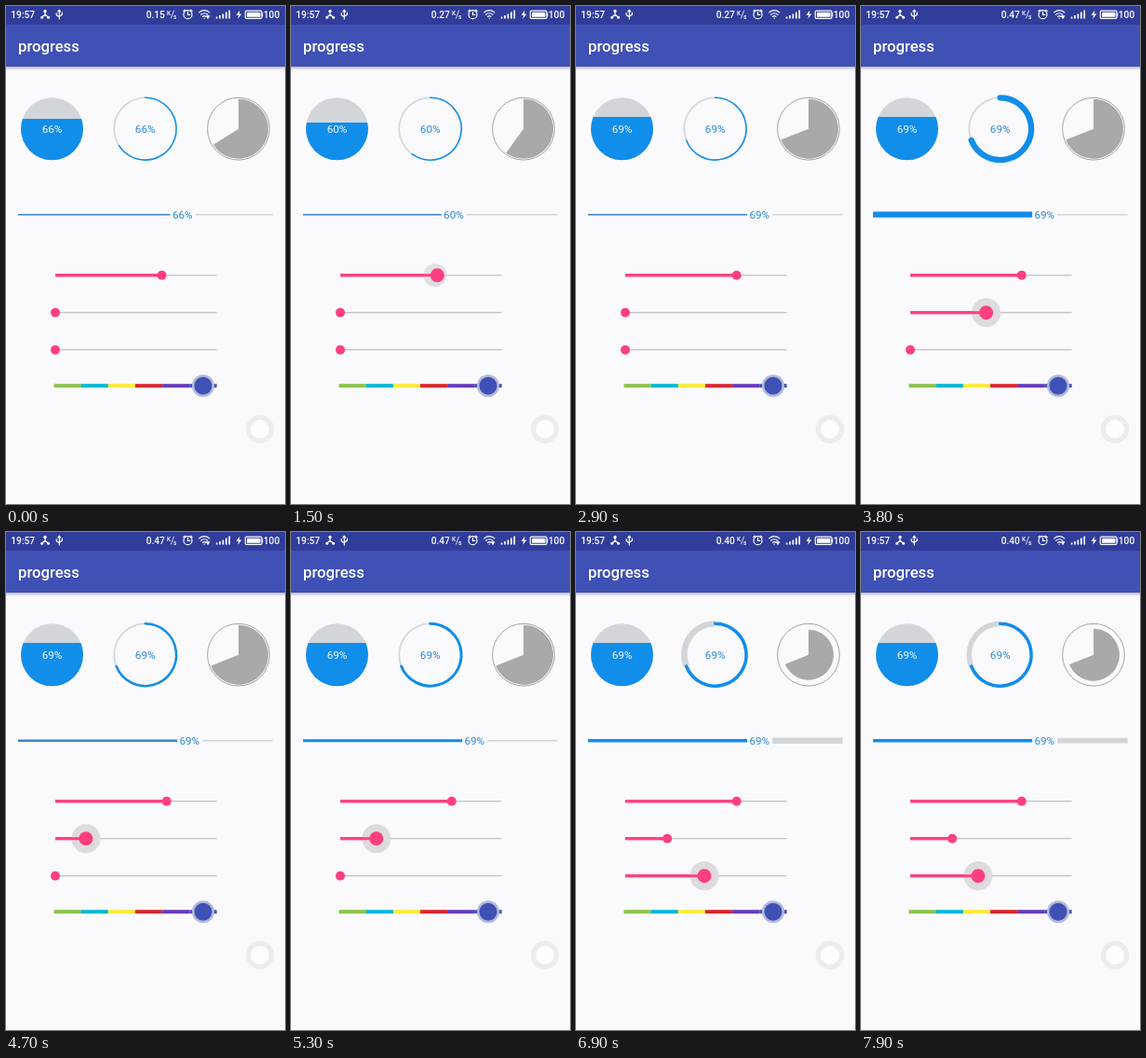
An HTML page that plays this animation: 300x534 px, repeating every 8 s.

```html
<!DOCTYPE html>
<html lang="en">
<head>
<meta charset="utf-8">
<title>progress</title>
<style>
html, body { margin: 0; width: 100%; height: 100%; overflow: hidden; background: #faf9fc; }
svg { display: block; width: 300px; height: 534px; font-family: Roboto, "Noto Sans", sans-serif; }
.status { fill: #fff; font-size: 10.2px; font-weight: 500; }
.status .unit { font-size: 6.5px; }
.icon { fill: none; stroke: #fff; stroke-width: 1.2; stroke-linecap: round; stroke-linejoin: round; }
.title { fill: #fff; font-size: 16.7px; font-weight: 500; }
.label { font-size: 11.7px; fill: #2b89d3; }
.mid { text-anchor: middle; }
.rest { fill: none; stroke: #d2d6da; }
.done { fill: none; stroke: #118dea; }
.track { stroke: #b1b0b3; stroke-width: 1.1; }
.fill { stroke: #fd3f80; stroke-width: 3; }
.thumb { fill: #fd3f80; }
.halo { fill: #dddbde; }
</style>
</head>
<body>
<svg viewBox="0 0 300 534">
  <defs>
    <linearGradient id="shade" x2="0" y2="1">
      <stop stop-color="#b9b9c6"/><stop offset="1" stop-color="#faf9fc"/>
    </linearGradient>
    <clipPath id="disc"><circle cx="49.5" cy="131.7" r="33.5"/></clipPath>
  </defs>
  <rect width="300" height="534" fill="#faf9fc"/>
  <rect y="65" width="300" height="4" fill="url(#shade)"/>
  <rect width="300" height="65" fill="#3f51b5"/>
  <rect width="300" height="20" fill="#313d9b"/>
  <text class="title" x="13" y="48.5">progress</text>

  <g class="status">
    <text x="5.3" y="13">19:57</text>
    <text id="rate" x="150.7" y="13"></text>
    <text class="unit" x="173" y="10">K</text>
    <text class="unit" x="180" y="14">s</text>
    <text x="276.8" y="13">100</text>
    <circle cx="42" cy="5.5" r="1.7"/>
    <circle cx="38.7" cy="12.3" r="1.5"/>
    <circle cx="45.6" cy="12.3" r="1.5"/>
    <path d="M251.5 4.5l-4 5.3h2.6l-.9 4 4.2-5.4h-2.7z"/>
    <rect x="259" y="6.8" width="14.5" height="5" rx=".6"/>
    <rect x="275" y="7.3" width="1.2" height="4"/>
    <path id="arrow" d="M214.5 10.3h5l-2.5 4z"/>
  </g>
  <g class="icon">
    <path d="M42 6v3.2l-3 2.6M42 9.2l3.2 2.6"/>
    <path d="M57.3 4.5v9.5M55.9 6l1.4-1.8L58.7 6M54.2 7.5v2.2l3.1 2M60.4 7v2.2l-3.1 2"/>
    <path stroke-width=".8" d="M177.5 13l3-8"/>
    <circle cx="195.5" cy="9.2" r="4.5"/>
    <path d="M195.5 6.5v2.9h2.2M190.9 5.5l1.4-1.3M200.1 5.5l-1.4-1.3"/>
    <path d="M207.6 6.9q5.6-4.5 11.2 0M209.5 9.2q3.7-2.9 7.4 0M211.6 11.3q1.6-1.2 3.2 0M213.2 13.2v.1"/>
    <path stroke-width="1.7" stroke-linecap="butt" d="M226.6 13.5v-2M230 13.5v-3.5M233.400 13.5v-5M236.800 13.5v-7M240.200 13.5v-9"/>
    <rect x="257.300" y="5.200" width="17.700" height="8.200" rx="1.200"/>
  </g>

  <g clip-path="url(#disc)">
    <rect x="16" y="98" width="67" height="68" fill="#d2d6da"/>
    <rect id="water" x="16" width="67" height="70" fill="#118dea"/>
  </g>
  <text class="label mid pct" x="49.5" y="136" style="fill:#f3f7fb"></text>

  <path id="ringRest" class="rest"/>
  <path id="ringDone" class="done" stroke-linecap="round"/>
  <text class="label mid pct" x="149.7" y="136.3"></text>

  <circle cx="250" cy="131.7" r="33.4" fill="none" stroke="#a3a2a5"/>
  <path id="pie" fill="#a9a8ab"/>

  <path id="lineDone" class="done"/>
  <path id="lineRest" class="rest"/>
  <text id="lineText" class="label pct" y="228"></text>

  <g id="sliders"></g>

  <g id="bands"></g>
  <circle cx="212" cy="407.200" r="12" fill="#b3b9da"/>
  <circle cx="212" cy="407.200" r="9.500" fill="#3f51b5"/>
  <circle cx="273" cy="453.700" r="12.600" fill="#fdfcfe" stroke="#ecebee" stroke-width="5.400"/>
</svg>
<script>
const NS = 'http://www.w3.org/2000/svg';
const $ = id => document.getElementById(id);
const LOOP = 8000, STEP = 100, CY = 131.7;

function add(parent, tag, attrs) {
  const el = parent.appendChild(document.createElementNS(NS, tag));
  set(el, attrs);
  return el;
}

function set(el, attrs) {
  for (const key in attrs) el.setAttribute(key, attrs[key]);
}

// keys: [time, percent]; press: touch start, release, end of fade
const sliders = [
  { y: 288.7, press: [1300, 2750, 2900],
    keys: [[1300, 66], [1400, 64], [2200, 33], [2400, 25], [2700, 69]] },
  { y: 328.7, press: [3300, 5500, 5700],
    keys: [[3300, 0], [3400, 7], [3800, 47], [4000, 53], [4100, 53], [4700, 19], [4900, 14], [5100, 15], [5400, 26]] },
  { y: 368.7, press: [5900, 9000, 9200],
    keys: [[5900, 0], [5950, 5], [6100, 13], [6600, 47], [6800, 52], [6900, 49], [7400, 15], [7500, 15], [7900, 42]] }
];

for (const s of sliders) {
  add($('sliders'), 'path', { class: 'track', d: `M53 ${s.y}H226.5` });
  s.fill = add($('sliders'), 'path', { class: 'fill' });
  s.halo = add($('sliders'), 'circle', { class: 'halo', cy: s.y });
  s.over = add($('sliders'), 'path', { class: 'fill' });
  s.thumb = add($('sliders'), 'circle', { class: 'thumb', cy: s.y });
}

['#8bc34a', '#00b8d4', '#ffeb3b', '#d8262c', '#673ab7', '#3f51b5'].forEach((fill, i) =>
  add($('bands'), 'rect', { x: 51.5 + i * 29.17, y: 405.2, width: 29.3, height: 4, fill }));

function valueAt(keys, t) {
  if (t <= keys[0][0]) return keys[0][1];
  for (let i = 1; i < keys.length; i++) {
    const [t0, a] = keys[i - 1], [t1, b] = keys[i];
    if (t <= t1) return a + (b - a) * (t - t0) / (t1 - t0);
  }
  return keys[keys.length - 1][1];
}

function polar(cx, r, turn) {
  const a = turn * 2 * Math.PI;
  return `${cx + r * Math.sin(a)} ${CY - r * Math.cos(a)}`;
}

function arc(cx, r, from, to) {
  return `${polar(cx, r, from)}A${r} ${r} 0 ${to - from > 0.5 ? 1 : 0} 1 ${polar(cx, r, to)}`;
}

function drawSlider(s, t) {
  const [down, up, end] = s.press;
  const x = 53 + 1.735 * s.value;
  const held = t >= down && t < up;
  const grow = Math.min(1, (t - down) / 400);
  const fade = t < up ? 1 : Math.max(0, 1 - (t - up) / (end - up));
  const line = `M53 ${s.y}H${x}`;
  set(s.fill, { d: line });
  set(s.over, { d: line });
  set(s.thumb, { cx: x, r: held ? 7.5 : 5 });
  set(s.halo, {
    cx: grow < 1 ? x - 2.5 : x,
    r: t < down ? 0 : 9.5 + 6 * grow,
    opacity: t < down ? 0 : fade * (0.7 + 0.3 * grow)
  });
}

function draw(t) {
  for (const s of sliders) {
    s.value = valueAt(s.keys, t);
    drawSlider(s, t);
  }
  const pct = Math.round(sliders[0].value), p = pct / 100;
  const width = s => Math.max(1.6, 0.135 * s.value);
  const doneW = width(sliders[1]), restW = width(sliders[2]);

  document.querySelectorAll('.pct').forEach(el => el.textContent = pct + '%');
  set($('water'), { y: 98.2 + 67 * (1 - p) });
  set($('ringRest'), { d: 'M' + arc(149.7, 33.4, p, 1), 'stroke-width': restW });
  set($('ringDone'), { d: 'M' + arc(149.7, 33.4, 0, p), 'stroke-width': doneW });
  set($('pie'), { d: `M250 ${CY}L${arc(250, 33.6 - restW, 0, p)}Z` });

  const x = 13 + 2.48 * pct;
  set($('lineDone'), { d: `M13 223.7H${x}`, 'stroke-width': doneW });
  $('lineDone').style.stroke = doneW < 3 ? '#3f80c6' : '';
  set($('lineRest'), { d: `M${x + 27} 223.7H286.7`, 'stroke-width': restW });
  set($('lineText'), { x: x + 2.3 });

  $('rate').textContent = t < 500 ? '0.15' : t < 3500 ? '0.27' : t < 6500 ? '0.47' : '0.40';
  set($('arrow'), { opacity: t >= 300 && t < 3300 ? 0 : 1 });
}

const start = performance.now();
function tick() {
  const t = (performance.now() - start) % LOOP;
  draw(Math.floor(t / STEP) * STEP);
  requestAnimationFrame(tick);
}
tick();
</script>
</body>
</html>
```
